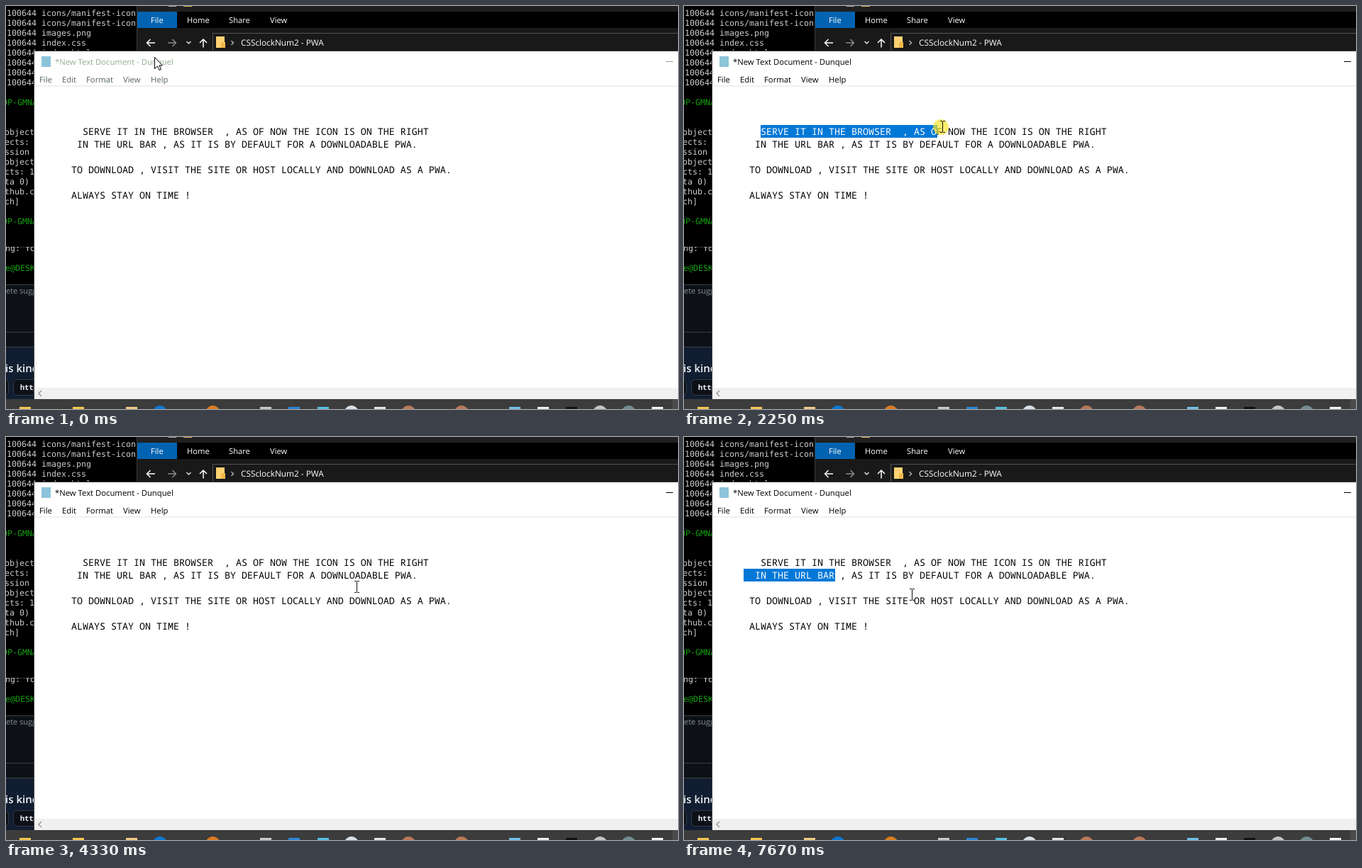
Recreate the animation shown at these times as an HTML page with a canvas. Size 947 px wide and 569 px high, loop 8000 ms.

```html
<!DOCTYPE html>
<html lang="en">
<head>
<meta charset="utf-8">
<title>Text editor demo</title>
<style>
html, body { margin: 0; width: 100%; height: 100%; overflow: hidden; background: #000; }
canvas { display: block; }
</style>
</head>
<body>
<canvas id="stage" width="947" height="569"></canvas>
<script>
const ctx = document.getElementById('stage').getContext('2d');
const LOOP = 8000;
const UI = '"Open Sans", "Noto Sans", sans-serif';
const MONO = '"Noto Sans Mono", "DejaVu Sans Mono", monospace';
const TERM = '"DejaVu Sans Mono", "Liberation Mono", monospace';

// Document grid
const LEFT = 44, TOP = 168, COL = 8, ROW = 18, LINE_END = 70;
const LINES = [
  '        SERVE IT IN THE BROWSER  , AS OF NOW THE ICON IS ON THE RIGHT',
  '       IN THE URL BAR , AS IT IS BY DEFAULT FOR A DOWNLOADABLE PWA.',
  '',
  '      TO DOWNLOAD , VISIT THE SITE OR HOST LOCALLY AND DOWNLOAD AS A PWA.',
  '',
  '      ALWAYS STAY ON TIME !'
];

// Screen updates come at a steady rate; the selection trails the pointer
const FIRST = 60, TICK = 67.86, LAG = 22;
const DRAG = [1075, 3240], CLICK = [3770, 4050], REDRAG = [4870, 6430];

// Pointer path: time, x, y
const PATH = [
  [0, 209, 72], [200, 196, 44], [640, 56, 162], [820, 83, 178], [1075, 87, 178],
  [1755, 219, 170], [1824, 249, 170], [2706, 497, 171], [3060, 624, 179],
  [3240, 624, 179], [3520, 657, 170], [3980, 690, 203], [4200, 560, 214],
  [4680, 87, 196], [4870, 88, 196], [5081, 160, 182], [5430, 208, 177],
  [5760, 208, 177], [5970, 214, 193], [6440, 214, 193], [7060, 388, 218],
  [7400, 388, 218], [7660, 321, 222]
];

const within = (t, [a, b]) => t >= a && t < b;

function pointer(t) {
  const i = PATH.findIndex(k => k[0] > t);
  if (i < 0) return PATH.at(-1).slice(1);
  const [t0, x0, y0] = PATH[i - 1], [t1, x1, y1] = PATH[i];
  const u = (t - t0) / (t1 - t0);
  return [x0 + (x1 - x0) * u, y0 + (y1 - y0) * u];
}

function rect(x, y, w, h, color) {
  ctx.fillStyle = color;
  ctx.fillRect(x, y, w, h);
}

function disc(x, y, r, color) {
  ctx.fillStyle = color;
  ctx.beginPath();
  ctx.arc(x, y, r, 0, Math.PI * 2);
  ctx.fill();
}

function text(s, x, y, font, color) {
  ctx.font = font;
  ctx.fillStyle = color;
  ctx.fillText(s, x, y);
}

function clipped(x, y, w, h, draw) {
  ctx.save();
  ctx.beginPath();
  ctx.rect(x, y, w, h);
  ctx.clip();
  draw();
  ctx.restore();
}

// Chevron pointing right, turned by quarter turns, with an optional shaft
function chevron(x, y, turns, size, color, shaft = 0) {
  ctx.save();
  ctx.translate(x, y);
  ctx.rotate(turns * Math.PI / 2);
  ctx.strokeStyle = color;
  ctx.lineWidth = 1.5;
  ctx.beginPath();
  ctx.moveTo(-size, -size);
  ctx.lineTo(0, 0);
  ctx.lineTo(-size, size);
  ctx.moveTo(0, 0);
  ctx.lineTo(-shaft, 0);
  ctx.stroke();
  ctx.restore();
}

function button(x, y, w, h) {
  ctx.beginPath();
  ctx.roundRect(x + .5, y + .5, w, h, 5);
  ctx.fillStyle = '#0d1117';
  ctx.fill();
  ctx.strokeStyle = '#343b45';
  ctx.lineWidth = 1;
  ctx.stroke();
}

function terminal() {
  rect(0, 0, 947, 569, '#000');
  const font = '11.63px ' + TERM, white = '#ccc', green = '#13a10e';
  const rows = (list, x, y) => list.forEach((s, i) => text(s, x, y + i * 14, font, white));
  rows(['icons/manifest-icon', 'icons/manifest-icon', 'images.png', 'index.css', 'index.html', '', '', '']
    .map(f => '100644 ' + f), 1, 14);
  rows(['objects', 'ects: 10', 'ssion us', 'objects', 'cts: 100', 'ta 0)', 'thub.co', 'ch]'], -2, 182);
  for (const y of [140, 308]) text('OP-GMNA', -5, y, font, green);
  rect(0, 340, 40, 1, '#333');
  clipped(0, 340, 40, 50, () => text('ng: You', -1, 346, font, white));
  text('e@DESK', -1, 374, font, green);
}

function page() {
  rect(0, 393, 40, 162, '#0d1117');
  rect(0, 481, 40, 74, '#111d30');
  for (const y of [393, 460, 481]) rect(0, y, 40, 1, '#3a3f46');
  text('ete sugg', 0, 406, '11px ' + UI, '#868d96');
  text('is kind', -1, 517, '600 15px ' + UI, '#f2f5f8');
  button(-20, 527, 23, 22);
  button(10, 527, 60, 22);
  text('http', 20, 542, '600 10.2px ' + MONO, '#f2f5f8');
}

function explorer() {
  rect(184, 0, 763, 64, '#3a3a3a');
  rect(185, 0, 762, 8, '#202020');
  rect(229, 0, 11, 1, '#aaa');
  rect(250, 0, 12, 1, '#e8b95b');
  rect(185, 8, 762, 23, '#000');
  rect(185, 8, 56, 23, '#0063b1');
  Object.entries({ File: 204, Home: 255, Share: 314, View: 372 })
    .forEach(([s, x]) => text(s, x, 24, '11.2px ' + UI, '#fff'));
  rect(185, 31, 762, 33, '#191919');
  chevron(198.5, 52, 2, 5, '#fff', 11.5);
  chevron(239.5, 52, 0, 5, '#888', 11.5);
  chevron(257.5, 53, 1, 3, '#ddd');
  chevron(278, 47, 3, 5, '#fff', 11.5);
  rect(291, 38, 656, 1, '#535353');
  rect(291, 38, 1, 26, '#535353');
  rect(296, 43, 12, 16, '#ffd273');
  rect(303, 51, 6, 8, '#f2b84b');
  chevron(320.5, 52, 0, 3, '#aaa');
  text('CSSclockNum2 - PWA', 331, 56, '11.8px ' + UI, '#fff');
}

// s: square, c: circle; a capital leaves a wide gap before the icon
function taskbar() {
  const shapes = 'sSScCSsscscCSssccs';
  const colors = ('#f5c750 #f5c750 #efcb86 #0d78d4 #d97c22 #c9c9c9 #2c86d8 #55bfe0 #d9e2e8 ' +
    '#e4e4e4 #b97858 #b97858 #70bfe8 #efefef #111 #c6c6c6 #718c90 #f4f4f4').split(' ');
  rect(0, 555, 947, 14, '#3c3c3c');
  rect(939, 555, 8, 14, '#4b4b4b');
  let x = -47.5;
  [...shapes].forEach((s, i) => {
    x += i && s > 'Z' ? 40.2 : 74.7;
    if (s.toLowerCase() === 'c') disc(x, 574, 10, colors[i]);
    else rect(Math.round(x) - 8, 566, 16, 3, colors[i]);
  });
}

// Selected ranges as [row, first column, end column]
function selection(q) {
  if (q >= REDRAG[0]) {
    const [x, y] = pointer(Math.min(q, REDRAG[1]) - LAG);
    const head = Math.round((x - LEFT) / COL);
    return y < TOP + ROW ? [[0, head, LINE_END], [1, 0, 5]] : [[1, 5, head]];
  }
  if (q >= DRAG[0] && q < CLICK[0]) {
    const [x] = pointer(Math.min(q, DRAG[1]) - LAG);
    const head = Math.min(LINE_END, Math.round((x - LEFT) / COL));
    if (head > 8) return [[0, 8, head]];
  }
  return [];
}

function body(color) {
  LINES.forEach((s, row) => {
    const col = s.search(/\S/);
    if (col >= 0) text(s.trim(), LEFT + col * COL, TOP + 14 + row * ROW, '13.3333px ' + MONO, color);
  });
}

function editor(q) {
  const active = q >= DRAG[0];
  const font = '11.3px ' + UI;
  rect(39, 63, 908, 492, '#3c3c3c');
  rect(40, 64, 907, 491, '#fff');
  rect(50, 71, 13, 15, '#8cc4da');
  text('*New Text Document - Dunquel', 69, 83, font, active ? '#000' : '#93ad93');
  rect(930, 78, 10, 1, active ? '#000' : '#8f9f8f');
  Object.entries({ File: 47, Edit: 79, Format: 113, View: 165, Help: 204 })
    .forEach(([s, x]) => text(s, x, 108, font, active ? '#000' : '#566656'));
  rect(40, 112, 907, 2, '#f0f0f0');
  rect(40, 539, 907, 16, '#f0f0f0');
  chevron(46, 547, 2, 4, '#999');
  body('#000');
  for (const [row, a, b] of selection(q)) {
    const box = [LEFT + a * COL, TOP + row * ROW, (b - a) * COL + 1, ROW];
    rect(...box, '#0078d7');
    clipped(...box, () => body('#fff'));
  }
}

function arrow(x, y) {
  ctx.beginPath();
  [[0, 0], [0, 16], [4, 12.5], [6.5, 18], [9, 17], [6.5, 11.5], [11, 11.5]]
    .forEach(([dx, dy]) => ctx.lineTo(x + dx + .5, y + dy + .5));
  ctx.closePath();
  ctx.fillStyle = '#fff';
  ctx.fill();
  ctx.strokeStyle = '#000';
  ctx.lineWidth = 1;
  ctx.stroke();
}

function beam(x, y) {
  rect(x, y - 7, 1, 15, '#111');
  for (const dy of [-8, 8]) {
    rect(x - 3, y + dy, 3, 1, '#111');
    rect(x + 1, y + dy, 3, 1, '#111');
  }
}

function cursor(q) {
  const [x, y] = pointer(q).map(Math.round);
  if ([DRAG, CLICK, REDRAG].some(press => within(q, press)))
    disc(x - 2, y + 1, 11, 'rgba(248,228,40,.68)');
  (y < 114 ? arrow : beam)(x, y);
}

function frame(now) {
  const t = now % LOOP;
  const q = t < FIRST ? 0 : FIRST + Math.floor((t - FIRST) / TICK) * TICK;
  ctx.textRendering = 'geometricPrecision';
  terminal();
  page();
  explorer();
  editor(q);
  taskbar();
  cursor(q);
  requestAnimationFrame(frame);
}
requestAnimationFrame(frame);
</script>
</body>
</html>
```
